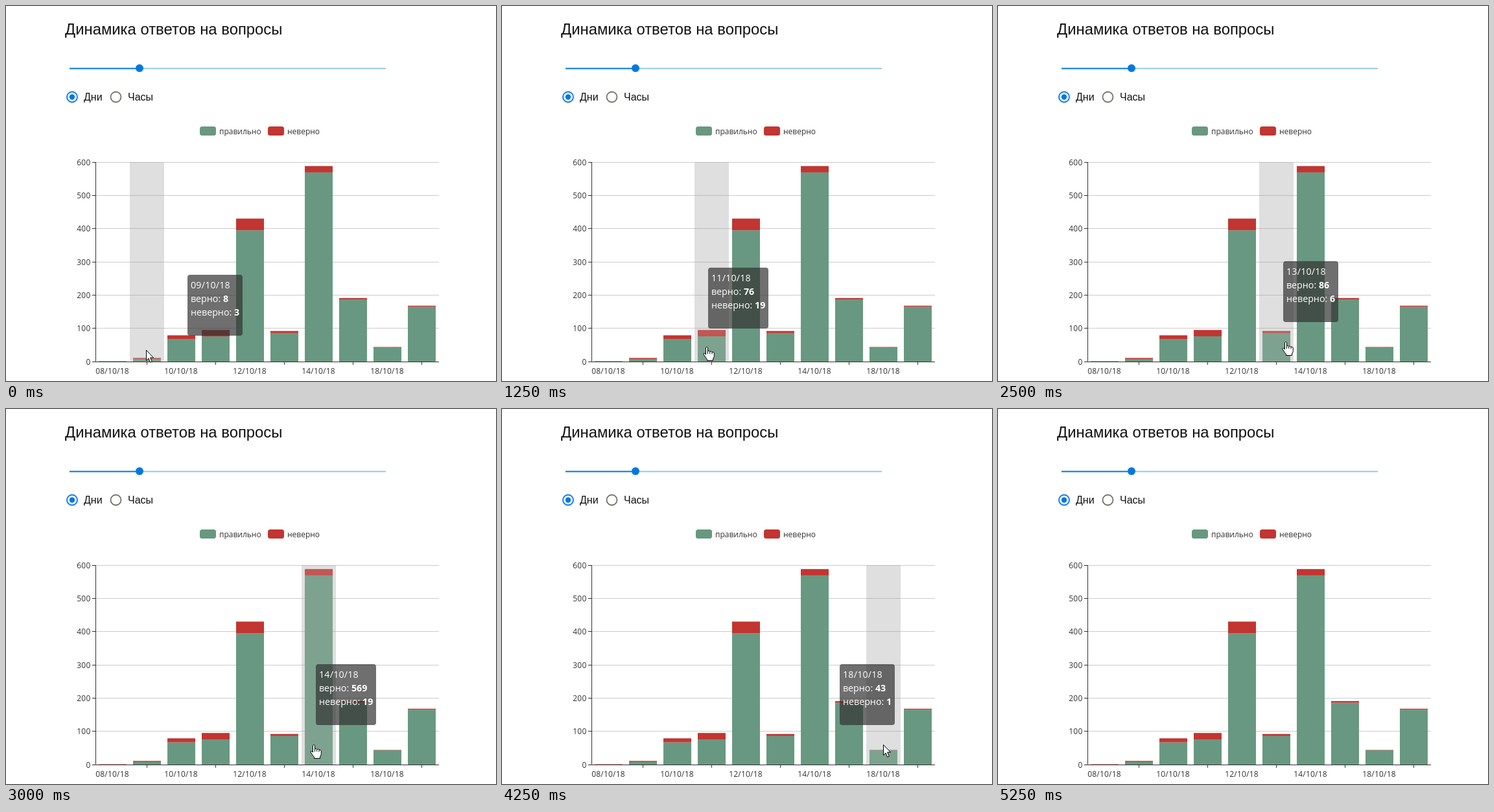
Write an HTML page that moves like this. It is 756 px wide and 579 px high and loops after 6000 ms.

```html
<!DOCTYPE html>
<html lang="ru">
<head>
<meta charset="utf-8">
<style>
html, body { margin: 0; width: 100%; height: 100%; overflow: hidden; background: #fff; }
svg { position: absolute; left: 0; top: 0; }
text { font: 12px "Open Sans", "Noto Sans", sans-serif; fill: #333; }
.ui { font: 16px "Liberation Sans", sans-serif; fill: #111; }
.title { font-size: 23.85px; }
.num { letter-spacing: .2px; }
#tip {
  position: absolute; height: 84px; padding: 5px; border-radius: 4px;
  background: rgba(50, 50, 50, .7); color: #fff; white-space: nowrap;
  font: 14.25px/21px "Open Sans", "Noto Sans", sans-serif;
}
#tip span { letter-spacing: .2px; }
</style>
</head>
<body>
<svg id="chart" width="756" height="579">
  <text class="ui title" x="91" y="44">Динамика ответов на вопросы</text>
  <path d="M206 96.5H586" stroke="#94c9e4" stroke-width="2"/>
  <path d="M98 96.5H206" stroke="#0078de" stroke-width="2"/>
  <circle cx="206" cy="96" r="6" fill="#0078de"/>
  <g fill="none" stroke-width="1.8">
    <circle cx="102" cy="140.5" r="8" stroke="#0a78dc"/>
    <circle cx="169.5" cy="140.5" r="8" stroke="#74746c"/>
  </g>
  <circle cx="102" cy="140.5" r="4.2" fill="#0078de"/>
  <text class="ui" x="120" y="146">Дни</text>
  <text class="ui" x="188" y="146">Часы</text>
  <rect x="299" y="186" width="25" height="14" rx="3.5" fill="#689881"/>
  <text x="329" y="198">правильно</text>
  <rect x="404" y="186" width="25" height="14" rx="3.5" fill="#c23531"/>
  <text x="434" y="198">неверно</text>
</svg>
<div id="tip"></div>
<svg width="756" height="579">
  <g id="cursor" fill="#fff" stroke="#000" stroke-linejoin="round">
    <path id="arrow" d="M.5 .5V16.5L4 13L6.7 19.3L9.3 18.2L6.6 12H11.5Z"/>
    <g id="hand">
      <path d="M-1.5 1.5Q0 -.8 1.5 1.5V7Q3.5 5.6 4.7 7.5Q6.7 6.4 8 8.3Q10.6 7.6 11.3 10V14.5Q11 17 9.5 19V21.5H.5V19.5Q-2 17 -3.5 14Q-6 11.5 -4.8 10.5Q-3.4 9.7 -1.5 12Z"/>
      <path d="M1.5 7V11M4.7 7.5V11M8 8.3V11.5" fill="none"/>
    </g>
  </g>
</svg>
<script>
const left = 138.5, right = 668, base = 549, cell = (right - left) / 10, unit = 308 / 600;
const colors = [['#689881', '#72a78e'], ['#c23531', '#d53a36']];

// day of October, right answers, wrong answers
const data = [
  [8, 0, 1], [9, 8, 3], [10, 67, 12], [11, 76, 19], [12, 395, 35],
  [13, 86, 6], [14, 569, 19], [17, 186, 5], [18, 43, 1], [19, 165, 3]
];

// step of 250 ms and pointer x
const path = [
  [0, 216], [2, 238], [3, 276], [4, 290], [6, 342], [7, 388],
  [9, 401], [10, 444], [11, 452], [14, 520], [17, 588], [20, 704]
];

const $ = id => document.getElementById(id);
const chart = $('chart'), tip = $('tip');

function add(tag, attrs, text = '') {
  const el = document.createElementNS('http://www.w3.org/2000/svg', tag);
  for (const key in attrs) el.setAttribute(key, attrs[key]);
  el.textContent = text;
  return chart.appendChild(el);
}
const line = (d, stroke) => add('path', { d, stroke, fill: 'none' });
const date = day => String(day).padStart(2, '0') + '/10/18';
const show = (el, on) => { el.style.display = on ? '' : 'none'; };
const gridY = v => Math.floor(base - v * unit) + .5;
const dayAt = x => Math.floor((x - left) / cell);

for (let v = 100; v <= 600; v += 100) line(`M${left} ${gridY(v)}H${right}`, '#ccc');

const bars = data.map(([, good, bad], i) => [good, bad].map((v, k) => add('rect', {
  x: Math.floor(left + (i + .1) * cell),
  y: base - (k ? good + bad : good) * unit,
  width: 43,
  height: v * unit,
  fill: colors[k][0]
})));

line(`M${left} 241V549.5H${right}`, '#333');
for (let v = 0; v <= 600; v += 100) {
  line(`M133 ${gridY(v)}H${left}`, '#333');
  add('text', { class: 'num', x: 130.5, y: gridY(v) + 4.5, 'text-anchor': 'end' }, v);
}
data.forEach(([day], i) => {
  const x = Math.floor(left + (i + .5) * cell);
  if (i % 2) line(`M${x + .5} 549V554`, '#333');
  else add('text', { class: 'num', x, y: 568, 'text-anchor': 'middle' }, date(day));
});
const band = add('rect', { y: 241, width: 53, height: 308, fill: 'rgba(150,150,150,.3)' });

function pointer(n) {
  const i = Math.max(1, path.findIndex(([step]) => step >= n));
  const [n0, x0] = path[i - 1], [n1, x1] = path[i];
  const x = x0 + (x1 - x0) * (n - n0) / (n1 - n0);
  const sink = Math.min(1, Math.max(0, (388 - x) / 112));
  return [x, 518 + 13 * sink];
}

// The tooltip trails the pointer and flips to its left near the edge.
function tooltip(n) {
  let tx = 280, ty = 415;
  for (let i = 1; i <= n; i++) {
    const [x, y] = pointer(i);
    const goal = x + 105 > 680 ? Math.min(x, right) - 105 : x + 20;
    tx += (goal - tx) * .55;
    ty += (y - 124 - ty) * .55;
  }
  return [tx, ty];
}

function draw(n) {
  const active = n <= 20;
  const [x, y] = active ? pointer(n) : [right, 0];
  const inside = x < right;
  const day = Math.min(9, dayAt(x)), bandDay = dayAt(x - 11);

  show(tip, active);
  show($('cursor'), active);
  show(band, inside);
  bars.forEach((pair, i) => pair.forEach((bar, k) =>
    bar.setAttribute('fill', colors[k][inside && i === day ? 1 : 0])));
  if (!active) return;

  const [num, good, bad] = data[day];
  const [tx, ty] = tooltip(n);
  band.setAttribute('x', Math.floor(left + bandDay * cell));
  tip.style.left = Math.round(tx) + 'px';
  tip.style.top = Math.round(ty) + 'px';
  tip.innerHTML = `<span>${date(num)}</span><br>верно: <b>${good}</b><br>неверно: <b>${bad}</b>`;

  const across = (x - left) / cell - day;
  const hand = bandDay === day && across > .1 && across < .9 && y > base - (good + bad) * unit;
  show($('hand'), hand);
  show($('arrow'), !hand);
  $('cursor').setAttribute('transform', `translate(${Math.round(x)} ${Math.round(y)})`);
}

let last = -1;
function tick() {
  const n = Math.floor(performance.now() % 6000 / 250);
  if (n !== last) draw(last = n);
  requestAnimationFrame(tick);
}
tick();
</script>
</body>
</html>
```
